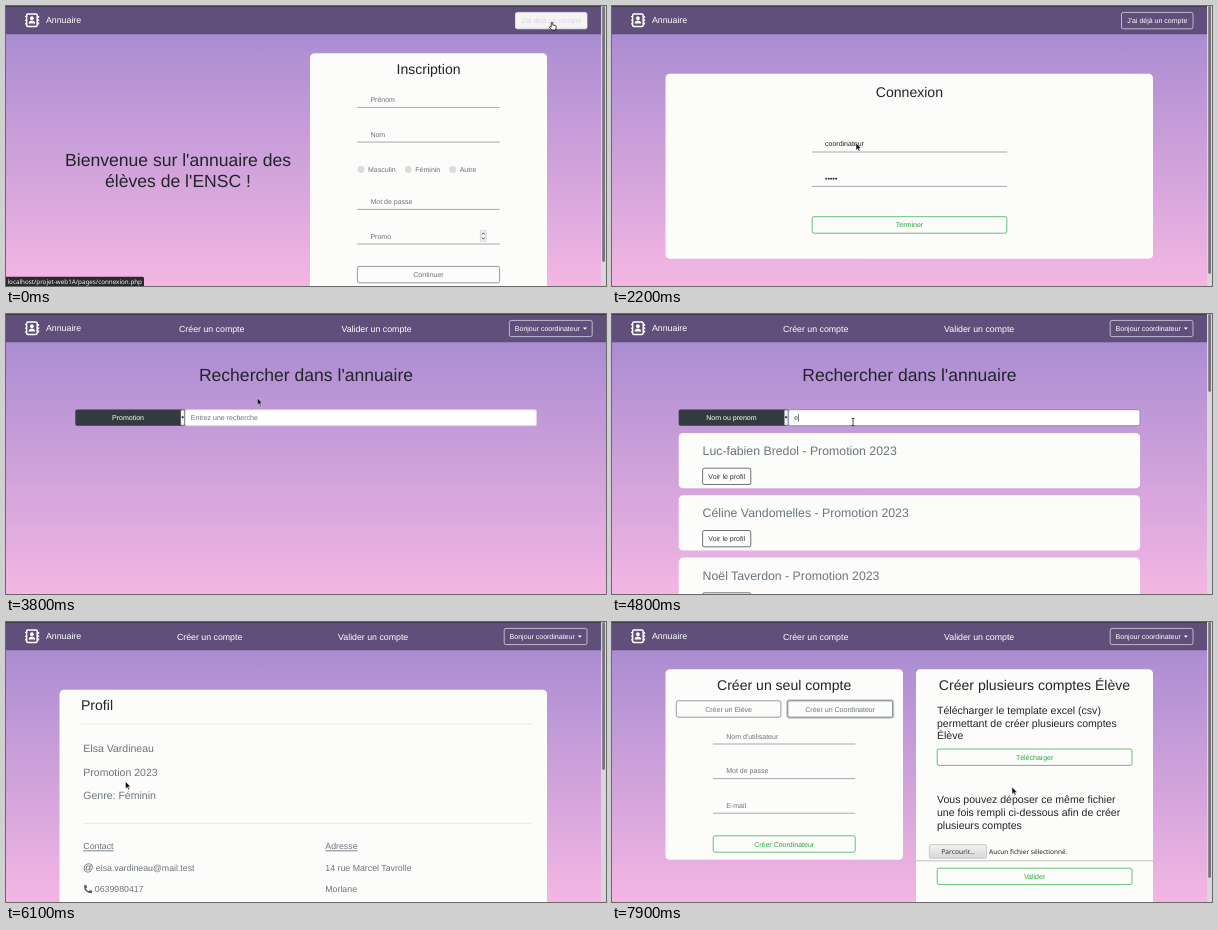
An HTML page for the animation above (8 s loop, 600x280 px).

```html
<!DOCTYPE html>
<html lang="fr">
<head>
<meta charset="utf-8">
<title>Annuaire</title>
<style>
html, body { margin: 0; width: 100%; height: 100%; overflow: hidden; background: #a58bd2 }
svg { display: block; width: 600px; height: 280px; font-family: "Liberation Sans", Arial, sans-serif; text-rendering: geometricPrecision }
.ui { font-family: "Noto Sans", "Open Sans", sans-serif }
</style>
</head>
<body>
<svg id="stage" viewBox="0 0 600 280"></svg>
<script>
const stage = document.getElementById('stage');
const LOOP = 8000;
// Font sizes: the 1366 px wide page is shown at 600 px
const S = 7.03, M = 8.79, L = 10.54, XL = 12.3, H2 = 14.05, H1 = 17.57;
const DARK = '#212529', GREY = '#6c757d', GREEN = '#28a745', PAPER = '#fcfcfa', BTN = '#343a40';

const rect = (x, y, w, h, fill, r = 0, stroke = 'none', sw = .7) =>
  `<rect x="${x}" y="${y}" width="${w}" height="${h}" rx="${r}" fill="${fill}" stroke="${stroke}" stroke-width="${sw}"/>`;
const text = (x, y, s, size = S, fill = GREY, extra = '') =>
  `<text x="${x}" y="${y}" font-size="${size}" fill="${fill}" ${extra}>${s}</text>`;
const mid = (x, y, s, size, fill, extra = '') => text(x, y, s, size, fill, 'text-anchor="middle" ' + extra);
const line = (x1, x2, y, color = '#85868a', w = .7) =>
  `<path d="M${x1} ${y}H${x2}" stroke="${color}" stroke-width="${w}"/>`;
const card = (x, y, w, h) => rect(x, y, w, h, PAPER, 4.4);
const button = (x, y, w, h, label, color = GREY, fill = 'none', ink = color) =>
  rect(x, y, w, h, fill, 1.8, color) + mid(x + w / 2, y + h / 2 + 2.5, label, S, ink);
const field = (x, w, y, label) => text(x + 13.2, y, label) + line(x, x + w, y + 5.4);
const lines = (x, y, step, size, color, ...rows) =>
  rows.map((s, i) => text(x, y + i * step, s, size, color)).join('');
const typed = (s, t, start, step) => s.slice(0, Math.max(0, Math.floor((t - start) / step) + 1));
const status = (w, s) => rect(-2, 270.8, w + 2, 12, '#2c2a2e', 1.5) +
  text(1.5, 278, s, 6.28, '#f4f4f4', 'class="ui"');
const scrollbar = h => rect(595, 0, 5, 280, '#dad7dc') + rect(596.2, 0, 2.8, h, '#77747b', 1.4);

const backdrop = `<defs><linearGradient id="sky" x2="0" y2="1">
  <stop stop-color="#a388d0"/><stop offset="1" stop-color="#f3b6e3"/></linearGradient>
  <linearGradient id="grey" x2="0" y2="1"><stop stop-color="#f2f2f2"/><stop offset="1" stop-color="#d6d6d6"/></linearGradient></defs>`
  + rect(0, 0, 600, 280, 'url(#sky)');

const navBase = rect(0, 0, 600, 28.3, '#604f7a') + rect(0, 0, 600, .9, '#3e3848')
  + rect(20.6, 8, 10.6, 12.4, 'none', 1.5, '#fff', 1.5)
  + `<g fill="#fff"><circle cx="25.9" cy="12.2" r="1.9"/><path d="M22.6 17.6c0-4 6.6-4 6.6 0z"/></g>`
  + `<path d="M19 10.5h1.5M19 14.2h1.5M19 17.9h1.5M32.6 10v2M32.6 13.3v2M32.6 16.6v2" stroke="#fff" stroke-width="1.1"/>`
  + text(40, 17, 'Annuaire', M, '#fff');

const guestNav = hover => navBase + button(509.5, 6.4, 71.5, 16.4, 'J\'ai déjà un compte',
  hover ? '#f5f3f4' : '#e9e5ee', hover ? '#f5f3f4' : 'none', hover ? '#dcd8dc' : '#fff');

// dx shifts centred content when the scrollbar is visible
const userNav = (dx, hover) => navBase
  + text(173 + dx * .8, 17.7, 'Créer un compte', M, hover ? '#c9c0d3' : '#fff')
  + text(335.5 + dx * 1.3, 17.7, 'Valider un compte', M, '#fff')
  + rect(503.4 + dx * 2, 6.4, 82.8, 16.2, 'none', 1.8, '#e9e5ee')
  + text(508.8 + dx * 2, 17.1, 'Bonjour coordinateur', S, '#fff')
  + `<path d="M${577 + dx * 2} 13.6h4l-2 2.2z" fill="#fff"/>`;

function signUp() {
  const radio = (x, s) => `<circle cx="${x}" cy="163.5" r="3.4" fill="#dcdcdc"/>` + text(x + 7, 166, s);
  return guestNav(true)
    + mid(172, 160, 'Bienvenue sur l\'annuaire des', H1, DARK) + mid(172, 181, 'élèves de l\'ENSC !', H1, DARK)
    + card(304, 47.2, 237, 250) + mid(422.5, 67.7, 'Inscription', H2, DARK)
    + field(351.2, 142.5, 96, 'Prénom') + field(351.2, 142.5, 130.7, 'Nom')
    + radio(355, 'Masculin') + radio(402.3, 'Féminin') + radio(446.7, 'Autre')
    + field(351.2, 142.5, 198, 'Mot de passe') + field(351.2, 142.5, 232.6, 'Promo')
    + rect(474.4, 224.3, 6, 11.2, '#efefef', 1.5, '#bbb', .5)
    + '<path d="M476 228.5l1.4-1.7 1.4 1.7M476 231.5l1.4 1.7 1.4-1.7" fill="none" stroke="#333" stroke-width=".8"/>'
    + button(351.4, 260.4, 142.2, 16.4, 'Continuer')
    + scrollbar(256) + status(138, 'localhost/projet-web1A/pages/connexion.php');
}

function signIn(t) {
  const user = typed('coordinateur', t, 1000, 68), pass = typed('••••••••', t, 1980, 50);
  const focus = t > 850 && t < 1900;
  return guestNav(false) + card(53.5, 67.8, 487.5, 185) + mid(297.4, 91, 'Connexion', H2, DARK)
    + (focus ? line(200, 395, 130, '#6f94a0', .9) : '') + line(200, 395, 146)
    + text(213, 140.2, user || 'Nom d\'utilisateur', S, user ? '#222' : GREY)
    + (focus ? rect(200.3, 146.3, 194.4, 18.3, '#5d5d5d', 0, '#303030', 1)
      + mid(297.4, 158, 'Afficher les identifiants enregistrés', 6.1, '#f2f2f2', 'class="ui"') : '')
    + text(213, 175, pass || 'Mot de passe', S, pass ? '#222' : GREY) + line(200, 395, 180.4)
    + button(200.2, 210.7, 194.6, 16.5, 'Terminer', GREEN) + scrollbar(268);
}

const people = ['Luc-fabien Bredol', 'Céline Vandomelles', 'Noël Taverdon'];
function search(t) {
  const alert = t < 3500, byName = t >= 4200, focus = t >= 4500;
  const query = t < 4700 ? '' : t < 5000 ? 'e' : t < 5200 ? 'el' : 'els';
  const many = query === 'e', hover = t >= 5550;
  const dx = many ? -2.6 : 0, y = alert ? 124.5 : 95.5;
  const found = many ? people : query ? ['Elsa Vardineau'] : [];
  return userNav(dx, false)
    + (alert ? rect(56.3, 28.6, 487.5, 22, '#d3edd6', 1.8)
      + text(65.7, 42.4, 'Vous êtes maintenant connecté.', S, '#1c5a2c', 'font-weight="bold"')
      + mid(531.5, 43, 'X', 8.2, '#56705b', 'font-weight="bold"') : '')
    + mid(300 + dx, y - 29, 'Rechercher dans l\'annuaire', H1, DARK)
    + rect(69.3 + dx, y, 108, 16.2, BTN, 1.8)
    + mid(122 + dx, y + 10.7, byName ? 'Nom ou prenom' : 'Promotion', S, '#fff')
    + rect(174.7 + dx, y + .5, 4, 15.2, '#f1f1f1', 0, '#444', .6)
    + `<path d="M${175.4 + dx} ${y + 7}h2.6l-1.3 2.3z"/>`
    + rect(179.2 + dx, y + .2, 351.4, 16, '#fff', 1.8, focus ? '#7695d8' : '#d8d2dd', focus ? 1 : .6)
    + text(184.8 + dx, y + 10.7, query || 'Entrez une recherche', S, query ? '#495057' : GREY)
    + (many ? rect(186.4, y + 4.7, .6, 7.4, '#222') : '')
    + found.map((name, i) => {
      const top = 119 + i * 62.3, x = 93.2 + dx;
      return card(69.3 + dx, top, 461.4, 55.3) + text(x, top + 22, name + ' - Promotion 2023', XL)
        + button(x, top + 35.2, 48.2, 16.3, 'Voir le profil', BTN, hover ? BTN : 'none', hover ? '#fff' : BTN);
    }).join('')
    + (many ? scrollbar(78) : '') + (hover ? status(141.5, 'localhost') : '');
}

function profile(t) {
  const hover = t >= 6520;
  return userNav(-2.6, hover) + card(53.5, 67.8, 487.5, 240) + text(75, 88, 'Profil', H2, DARK)
    + line(75, 526, 102, '#dededc') + line(77, 526, 201.3, '#dededc')
    + lines(77.3, 130.2, 23.5, L, GREY, 'Elsa Vardineau', 'Promotion 2023', 'Genre: Féminin')
    + text(77.3, 227.4, 'Contact', M, GREY, 'text-decoration="underline"')
    + text(319.3, 227.4, 'Adresse', M, GREY, 'text-decoration="underline"')
    + mid(82.2, 249, '@', 10.4, '#555c63')
    + text(89.8, 248.8, 'elsa.vardineau@mail.test', M) + text(88.8, 270, '0639980417', M)
    + '<path d="M78 263.4l2.1-.6 1 2.6-1.2 1q.9 2 2.9 2.9l1-1.2 2.6 1-.6 2.1q-8-.4-7.8-7.8" fill="#555c63"/>'
    + lines(319.3, 248.8, 21.2, M, GREY, '14 rue Marcel Tavrolle', 'Morlane')
    + scrollbar(148) + (hover ? status(148.5, 'localhost/projet-web1A/pages/creerComptes.php') : '');
}

function accounts(t) {
  const form = t >= 7250;
  return userNav(-2.6, t < 7000)
    + card(53.5, 47.2, 237.5, form ? 190.6 : 58) + mid(172.2, 67.7, 'Créer un seul compte', H2, DARK)
    + button(64.3, 78.8, 104.6, 16.4, 'Créer un Elève')
    + (form ? rect(175.2, 78.2, 106, 17.6, 'none', 2.2, '#c3c7ca', 2) : '')
    + button(175.8, 78.8, 104.8, 16.4, 'Créer un Coordinateur')
    + (form ? field(101, 142.3, 116.6, 'Nom d\'utilisateur') + field(101, 142.3, 151.2, 'Mot de passe')
      + field(101, 142.3, 185.8, 'E-mail') + button(101.2, 213.8, 142, 16.4, 'Créer Coordinateur', GREEN) : '')
    + card(304, 47.2, 237, 250) + mid(422.5, 67.7, 'Créer plusieurs comptes Élève', H2, DARK)
    + lines(325, 91.8, 12.7, L, DARK, 'Télécharger le template excel (csv)', 'permettant de créer plusieurs comptes', 'Élève')
    + button(325.2, 127, 194.8, 16.4, 'Télécharger', GREEN)
    + lines(325, 181.2, 12.7, L, DARK, 'Vous pouvez déposer ce même fichier', 'une fois rempli ci-dessous afin de créer', 'plusieurs comptes')
    + rect(317.4, 222.6, 57.2, 13.6, 'url(#grey)', 1.5, '#b9b9b9')
    + mid(346, 231.7, 'Parcourir...', 6.7, '#333', 'class="ui"')
    + text(377, 231.7, 'Aucun fichier sélectionné.', 6.5, '#222', 'class="ui"')
    + line(304, 541, 238.8, '#a5a6a9') + button(325.2, 246.2, 194.8, 16.4, 'Valider', GREEN)
    + scrollbar(256);
}

// Pointer stops: time, x, y
const route = [[0, 546, 16], [300, 546, 16], [800, 244, 137], [2500, 244, 137], [2900, 133.5, 58],
  [3000, 133.5, 58], [3400, 531, 40], [3550, 531, 40], [3950, 124, 104], [4200, 124, 104], [4480, 241, 108],
  [5220, 241, 108], [5600, 119.5, 159.5], [6100, 119.5, 159.5], [6550, 209, 12.5], [6920, 209, 12.5],
  [7200, 228, 86], [7350, 228, 86], [7850, 400, 165], [LOOP, 400, 165]];
const shapes = {
  arrow: '<path d="M0 0V7.2L1.7 5.7 2.8 8.2 4 7.7 2.9 5.2H5.1z" fill="#111" stroke="#eee" stroke-width=".5"/>',
  hand: '<path d="M-.8.8Q0-.6.8.8V3L3.6 3.6Q4.4 3.9 4.2 5L3.6 8H-.4L-2.6 5.2Q-2.2 4-.8 5z" fill="#fff" stroke="#111" stroke-width=".8"/>',
  beam: '<path d="M-1.5-3.6H1.5M0-3.6V3.6M-1.5 3.6H1.5" stroke="#222" stroke-width=".8"/>'
};

function pointer(t) {
  const i = route.findIndex(p => p[0] > t), [t0, x0, y0] = route[i - 1], [t1, x1, y1] = route[i];
  const k = (t - t0) / (t1 - t0), e = k * k * (3 - 2 * k);
  const kind = t < 330 || (t >= 5550 && t < 6100) || (t >= 6520 && t < 7000) ? 'hand'
    : t >= 4420 && t < 5280 ? 'beam' : 'arrow';
  return `<g transform="translate(${x0 + (x1 - x0) * e} ${y0 + (y1 - y0) * e})">${shapes[kind]}</g>`;
}

function page(t) {
  if (t < 250) return signUp();
  if (t < 2500) return signIn(t);
  if (t < 6000) return search(t);
  return t < 6850 ? profile(t) : accounts(t);
}

function draw(now) {
  const t = now % LOOP;
  stage.innerHTML = backdrop + page(t) + pointer(t);
  requestAnimationFrame(draw);
}
draw(performance.now());
</script>
</body>
</html>
```
